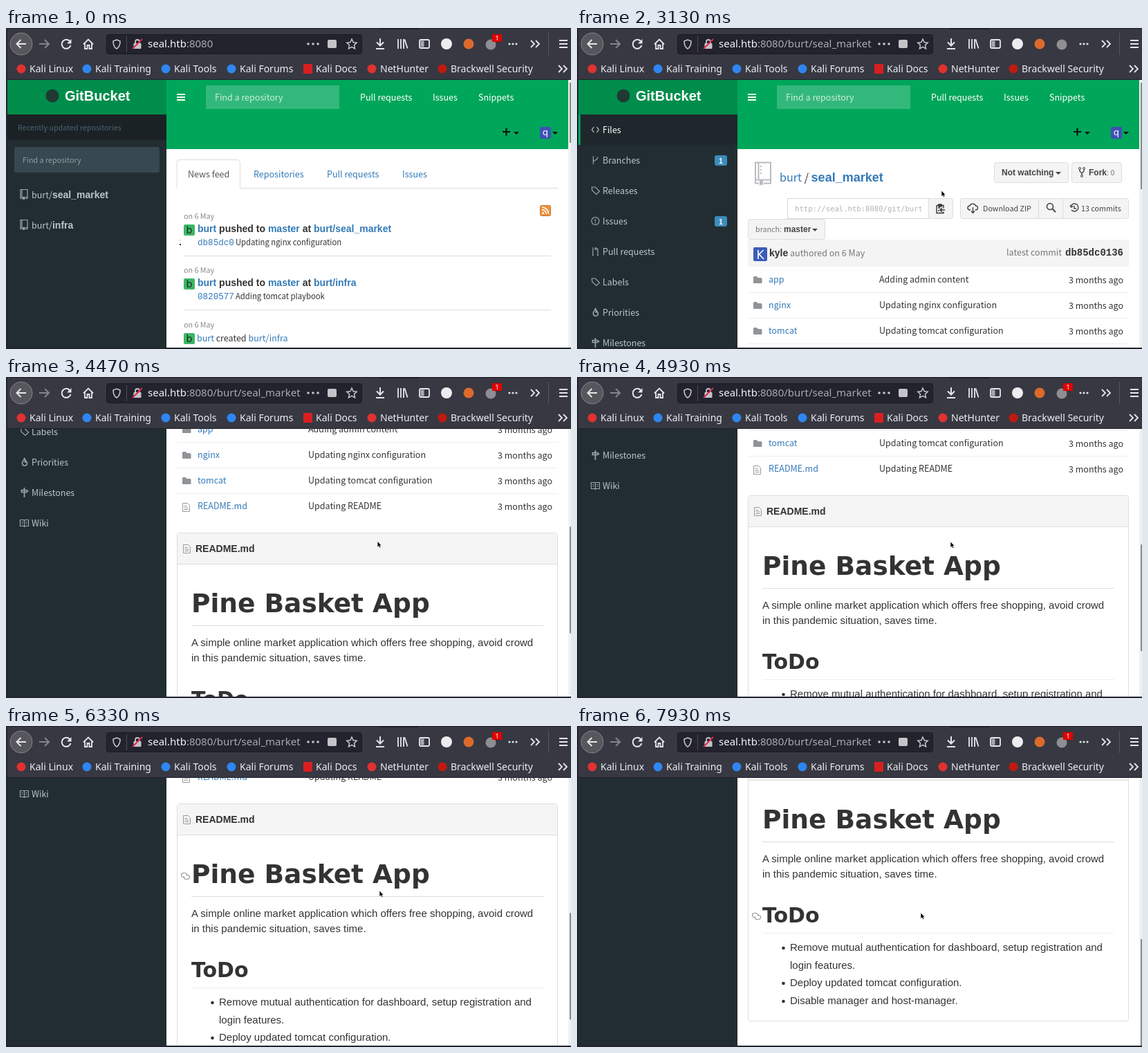
These frames come from a looping animation (817x464 px, 8 s). An HTML page:

```html
<!DOCTYPE html>
<html lang="en">
<head>
<meta charset="utf-8">
<title>Repository browsing</title>
<style>
html, body { margin: 0; width: 100%; height: 100%; overflow: hidden; background: #23252e; }
svg { display: block; width: 100%; height: 100%; }
text { white-space: pre; }
.ui { font-family: "Noto Sans", "Open Sans", sans-serif; }
.page { font-family: "Noto Sans CJK SC", "Noto Sans CJK JP", "Noto Sans CJK", "Noto Sans", sans-serif; }
.bold { font-family: "Liberation Sans", Arial, sans-serif; font-weight: 700; }
.body { font-family: "Liberation Sans", Arial, sans-serif; }
.mono { font-family: "Liberation Mono", monospace; }
.code { font-family: "DejaVu Sans Mono", monospace; }
.head { font-family: "DejaVu Sans", sans-serif; font-weight: 700; }
.avatar { font-family: "DejaVu Sans", sans-serif; }
</style>
</head>
<body>
<svg id="stage" viewBox="0 0 817 464"></svg>
<script>
const LOOP = 8000;
const LINK = '#337ab7', INK = '#333', MUTED = '#777', SIDE = '#b8c7ce';
const USER = 'burt', AUTHOR = 'kyle', REPO = 'seal_market';
const PATH = `/${USER}/${REPO}`;
const PAGE_SCALE = .895; // the page face is drawn larger than its nominal size

const rect = (x, y, w, h, fill, more = '') =>
  `<rect x="${x}" y="${y}" width="${w}" height="${h}" fill="${fill}" ${more}/>`;
const circle = (x, y, r, fill, more = '') =>
  `<circle cx="${x}" cy="${y}" r="${r}" fill="${fill}" ${more}/>`;
const line = (d, stroke, w = 1, more = '') =>
  `<path d="${d}" fill="none" stroke="${stroke}" stroke-width="${w}" ${more}/>`;
const shape = (d, fill) => `<path d="${d}" fill="${fill}"/>`;
const group = (id, content, more = '') => `<g id="${id}" ${more}>${content}</g>`;
const at = (x, y, content) => `<g transform="translate(${x} ${y})">${content}</g>`;
const face = (cls, size) => `class="${cls}" font-size="${cls === 'page' ? size * PAGE_SCALE : size}"`;
const text = (x, y, s, cls, size, fill, more = '') =>
  `<text x="${x}" y="${y}" ${face(cls, size)} fill="${fill}" ${more}>${s}</text>`;
const span = (s, cls, size, fill) => `<tspan ${face(cls, size)} fill="${fill}">${s}</tspan>`;
const caret = (x, y, fill) => shape(`M${x} ${y}h8l-4 4z`, fill);
const button = (x, y, w, h) =>
  rect(x + .5, y + .5, w - 1, h - 1, '#f4f4f4', 'stroke="#ddd" rx="3"');

// ---------- browser chrome ----------

function toolbar() {
  const c = '#e6e6ea', dim = '#85858c', edge = '#1f2028';
  const chevrons = (x, y) => line(`M${x - 6} ${y - 5}l5 5-5 5M${x + 1} ${y - 5}l5 5-5 5`, c, 1.8);
  const marks = [
    ['Kali Linux', 34, '#e0322f'], ['Kali Training', 129, '#2f86f0'], ['Kali Tools', 243, '#2f86f0'],
    ['Kali Forums', 338, '#2f86f0'], ['Kali Docs', 448, '#d81f1f', 1], ['NetHunter', 541, '#e0322f'],
    ['Brackwell Security', 643, '#c01a10'],
  ];
  return rect(0, 0, 817, 75, '#373842') + rect(0, 0, 817, 1, edge) + rect(540, 0, 56, 2, edge) +
    rect(0, 74, 817, 1, edge) + rect(0, 0, 2, 75, '#23252e') +
    circle(22, 23, 16, '#56565d', 'stroke="#85858b"') +
    line('M29 23H15.5M21.5 17l-6 6 6 6', c, 2) +
    line('M48 23h13.5M56 17l6 6-6 6', dim, 2) +
    group('reload', line('M92.5 19.5A6.5 6.5 0 1 0 93.5 25', c, 2) + shape('M94.5 16v6.5h-6.5z', c)) +
    group('stop', line('M81 17l12 12M93 17l-12 12', c, 2)) +
    line('M112 23.5l7-7 7 7M114 22.5V30h3.5v-5h3v5h3.5v-7.5', c, 1.8) +
    rect(145.5, 9.5, 369, 28, '#22232d', 'stroke="#191a22" rx="3"') +
    line('M160 17l5 2c0 6-1.5 9-5 11-3.5-2-5-5-5-11z', '#c4c4c8', 1.6) + rect(174, 12, 1, 23, '#4c4d56') +
    rect(184.5, 22, 11, 8, '#c4c4c8', 'rx="1"') + line('M187 22v-2a3 3 0 0 1 6 0v2', '#c4c4c8', 1.8) +
    line('M183 30L197 16', '#e22850', 2) +
    `<text x="205" y="28" ${face('ui', 15)} fill="#f4f4f6">seal.htb<tspan id="path" fill="#aaaab2"></tspan></text>` +
    [437, 444, 451].map(x => circle(x, 23, 1.8, '#c8c8cc')).join('') +
    rect(465, 17, 13, 12, '#c4c4c8', 'rx="2"') +
    line('M500 16l2.2 4.7 5 .6-3.7 3.5 1 5-4.5-2.5-4.5 2.5 1-5-3.7-3.5 5-.6z', '#c8c8cc', 1.5) +
    line('M541 15v10M536 20.5l5 5 5-5M535 30h12', c, 2) +
    line('M567 16v14M571 16v14M575 16v14M576.5 16.5l4 13', c, 1.8) +
    rect(598, 17, 14, 12, 'none', `rx="2" stroke="${c}" stroke-width="1.8"`) + rect(599.5, 18.5, 5, 9, '#a8a8ae') +
    circle(637, 23, 8, '#ededf0') + circle(669, 23, 7.5, '#dc6a2c') + circle(701, 24, 7.5, '#8e8e93') +
    group('badge', rect(703, 9, 14, 11, '#e00000') + text(710, 18, '1', 'ui', 9.5, '#fff', 'text-anchor="middle"')) +
    [728, 733, 738].map(x => circle(x, 23, 1.6, '#d5e6e2')).join('') +
    chevrons(765, 23) + rect(784, 7, 1, 32, '#55565f') +
    [18, 23, 28].map(y => rect(800, y - 1, 12, 2, c)).join('') +
    marks.map(([label, x, fill, square]) =>
      (square ? rect(x - 18, 52, 13, 14, fill) : circle(x - 12, 59, 6.5, fill)) +
      text(x, 64, label, 'ui', 14, '#eeeef2')).join('') +
    chevrons(805, 59);
}

// ---------- shared page parts ----------

function header() {
  return rect(2, 75, 230, 50, '#008d4c') + rect(232, 75, 581, 100, '#00a65a') +
    circle(67, 98, 9.5, '#1f3a33') + text(85, 105, 'GitBucket', 'bold', 20, '#fff') +
    [95, 99, 103].map(y => rect(247, y, 12, 2, '#fff')).join('') +
    rect(289, 83, 193, 34, '#33b87b') + text(302, 105, 'Find a repository', 'page', 14, '#cdeedd') +
    [['Pull requests', 512], ['Issues', 617], ['Snippets', 683]]
      .map(([s, x]) => text(x, 105, s, 'page', 14, '#fff')).join('') +
    line('M718 150h11M723.5 144.5v11', '#111', 2.2) + caret(734, 150, '#111') +
    rect(772, 143, 16, 17, '#3f51b5', 'rx="2"') + text(780, 155, 'q', 'avatar', 13, '#fff', 'text-anchor="middle"') +
    caret(790, 150, '#111');
}

const bookIcon = (fill) =>
  line('M1 .5h10v11H1zM1 11.5v2h2.5M7 13.5h4v-2M3 .5v11', fill, 1.2) + shape('M4 11.5h3v4l-1.5-1.2L4 15.5z', fill);

// ---------- news feed ----------

function sideRepo(y, name, ink, icon) {
  return at(20, y - 13, bookIcon(icon)) +
    text(37, y, span(USER + '/', 'page', 14, ink) + span(name, 'bold', 14, ink), 'page', 14, ink);
}

function push(y, repo, hash, message) {
  const b = (s, fill) => span(s, 'bold', 14, fill);
  return text(257, y + 276, 'on 6 May', 'page', 12, '#888') + userIcon(y + 284) +
    text(277, y + 295, b(USER, LINK) + b(' pushed to ', INK) + b('master', LINK) + b(' at ', INK) +
      b(`${USER}/${repo}`, LINK), 'bold', 14, INK) +
    text(277, y + 314, hash, 'mono', 12.6, LINK) + text(332, y + 314, message, 'page', 12.6, INK) +
    rect(257, y + 329, 531, 1, '#ddd');
}

const userIcon = (y) => rect(257, y, 16, 16, '#3cb665', 'rx="2"') +
  text(265, y + 13, USER[0], 'avatar', 14, '#1c2b20', 'text-anchor="middle"');

function feed() {
  return rect(2, 75, 230, 387, '#222d32') + header() +
    rect(2, 125, 230, 37, '#1a2226') + text(17, 148, 'Recently updated repositories', 'page', 12, '#4b646f') +
    rect(12, 172, 210, 37, '#374850', 'rx="3"') + text(24, 195, 'Find a repository', 'page', 12, '#919da3') +
    sideRepo(246, REPO, SIDE, '#9aa8af') + sideRepo(290, 'infra', SIDE, '#9aa8af') +
    group('rowHover', rect(2, 219, 230, 44, '#f7f7f7') + sideRepo(246, REPO, INK, '#8d8d8d')) +
    line('M247 231.5V194.5a4 4 0 0 1 4-4h83.5a4 4 0 0 1 4 4v37H798', '#ddd') +
    text(263, 216, 'News feed', 'page', 14, '#555') +
    [['Repositories', 358], ['Pull requests', 464], ['Issues', 573]]
      .map(([s, x]) => text(x, 216, s, 'page', 14, LINK)).join('') +
    rect(772.5, 256.5, 15, 15, '#f0913c', 'rx="2" stroke="#c8742a"') +
    circle(776.5, 267.5, 1.5, '#fff') + line('M775 262.5a6 6 0 0 1 6 6M775 259a9.5 9.5 0 0 1 9.5 9.5', '#fff', 1.7) +
    push(0, REPO, 'db85dc0', 'Updating nginx configuration') +
    push(78, 'infra', '0820577', 'Adding tomcat playbook') +
    text(257, 433, 'on 6 May', 'page', 12, '#888') + userIcon(441) +
    text(276, 453, span(USER, 'page', 14, LINK) + ' created ' + span(USER + '/infra', 'page', 14, LINK), 'page', 14, INK);
}

// ---------- repository ----------

const tag = 'M1 2h5l6 6-4.5 4.5L1.5 7z';
const menu = [
  ['Files', 'M4 3L1 7l3 4M8 3l3 4-3 4'],
  ['Branches', 'M3 3v8M9 4c0 4-6 2-6 6M2 2h2M2 12h2M8 3h2'],
  ['Releases', tag],
  ['Issues', 'M6 1.5a5.5 5.5 0 1 0 .1 0M6 4v4M6 9v1.5'],
  ['Pull requests', 'M2.5 3v9M1.5 2h2M1.5 12.5h2M6 3h3.5v9M7.5 1l-2 2 2 2M8.5 12.5h2'],
  ['Labels', tag],
  ['Priorities', 'M6 1c1 3-3 4-3 7 0 6 7 5 7 1 0-2-1-3-2-4 0 2-1 2-1 2 1-2 0-4-1-6z'],
  ['Milestones', 'M6 0v14M2 3.5h7l2 1.5-2 1.5H2z'],
  ['Wiki', 'M0 2.5h5l1 1 1-1h5v9H7l-1 1-1-1H0zM6 3.5v8M2 5.5h2M2 8h2M8 5.5h2M8 8h2'],
];

function repoMenu() {
  return rect(2, 75, 230, 870, '#222d32') + rect(2, 125, 230, 44, '#1e282c') + rect(2, 125, 3, 44, '#00a65a') +
    menu.map(([label, icon], i) => {
      const y = 147 + 44 * i;
      const count = label === 'Branches' || label === 'Issues';
      return at(20.5, y - 7, line(icon, i ? '#98a7ae' : '#c3ced3', i === 6 || i === 7 ? 1.7 : 1.2)) +
        text(37, y + 5, label, 'page', 14, i ? SIDE : '#fff') +
        (count ? rect(199, y - 7, 18, 15, '#3c8dbc', 'rx="3"') +
          text(208, y + 4.5, '1', 'bold', 10.5, '#fff', 'text-anchor="middle"') : '');
    }).join('');
}

const docIcon = line('M.5 .5h7l3 3v9H.5zM2.5 4.5h4M2.5 7h6M2.5 9.5h6', '#999');
const folder = shape('M0 1.5q0-1.5 1.5-1.5H5l1.5 2H11q1.5 0 1.5 1.5V9q0 1-1 1H1q-1 0-1-1z', '#8f9499');

const files = [
  ['app', 'Adding admin content'], ['nginx', 'Updating nginx configuration'],
  ['tomcat', 'Updating tomcat configuration'], ['README.md', 'Updating README'],
];
const ROW_TOP = 345, ROW = 37;

function fileList() {
  return files.map(([name, message], i) => {
    const y = ROW_TOP + ROW * i;
    return at(255, y + 14, i < 3 ? folder : docIcon) +
      text(277, y + 23, name, 'page', 14, LINK) + text(437, y + 23, message, 'page', 14, INK) +
      text(790, y + 24, '3 months ago', 'page', 14, INK, 'text-anchor="end"') +
      (i ? rect(247, y, 551, 1, '#eee') : '');
  }).join('');
}

function repoHead() {
  return line('M258 194.5h22v25h-22zM258 219.5v5h5M270 224.5h10v-5M262.5 195v24', '#b9bcbf', 2) +
    shape('M264 220h5v8l-2.5-2-2.5 2zM265 199h2v2h-2zM265 204h2v2h-2zM265 209h2v2h-2z', '#b9bcbf') +
    text(293, 222, span(USER, 'page', 18, LINK) + span(' / ', 'page', 18, INK) + span(REPO, 'bold', 18, LINK), 'page', 18, INK) +
    button(603, 194, 108, 30) + text(614, 213, 'Not watching', 'bold', 12, '#444') + caret(692, 208, '#444') +
    button(715, 194, 73, 30) + line('M727 204v3l3 3 3-3v-3M730 210v4', '#444', 1.4) +
    [[727, 203], [733, 203], [730, 214]].map(([x, y]) => circle(x, y, 1.5, '#f4f4f4', 'stroke="#444"')).join('') +
    text(740, 213, span('Fork', 'bold', 12, '#444') + span(': 0', 'page', 12, MUTED), 'page', 12, '#444') +
    rect(304.5, 246.5, 204, 29, '#fff', 'stroke="#d2d6de"') +
    `<g clip-path="url(#field)">${text(315, 265, 'http://seal.htb:8080/git' + PATH, 'code', 10.6, '#b4b4b4')}</g>` +
    button(508, 246, 36, 30) + line('M520 256.5h10v4M520 256.5v11h10v-2M523 255h4v3h-4zM532 263h-7M528 260l-3 3 3 3M522 260h3M522 264h2', '#333', 1.4) +
    button(554, 246, 244, 30) + rect(667, 247, 1, 28, '#ddd') + rect(702, 247, 1, 28, '#ddd') +
    line('M569 263h-1a3 3 0 0 1 0-6 4.5 4.5 0 0 1 8.5 0 3 3 0 0 1 0 6h-1M572.5 259v8M570 264.5l2.5 3 2.5-3', '#444', 1.4) +
    text(587, 265, 'Download ZIP', 'page', 12, '#444') +
    circle(684, 258, 4.5, 'none', 'stroke="#444" stroke-width="1.6"') + line('M687.5 261.5l4.5 4.5', '#444', 2) +
    line('M714 258a5.5 5.5 0 1 1 1 5M713 256l1.5 3 3-1.5M719 257v4h3', '#444', 1.4) +
    text(729, 265, '13 commits', 'page', 12, '#444') +
    button(247, 276, 112, 30) + text(258, 295, 'branch:', 'page', 12, MUTED) +
    text(299, 295, 'master', 'bold', 12, '#444') + caret(340, 290, '#444') +
    rect(247, 306, 551, 39, '#f4f4f4') + rect(255, 317, 20, 20, '#3a5db8', 'rx="2"') +
    text(265, 333.5, AUTHOR[0].toUpperCase(), 'avatar', 17, '#fff', 'text-anchor="middle"') +
    text(278, 330, AUTHOR, 'bold', 14, INK) + text(308, 330, 'authored on 6 May', 'page', 14, MUTED) +
    text(701, 329, 'latest commit', 'page', 14, MUTED, 'text-anchor="end"') +
    text(706, 329, 'db85dc0136', 'mono', 14, INK, 'font-weight="700"');
}

function readme() {
  const para = (x, y, s) => text(x, y, s, 'body', 15, INK);
  return rect(247.5, 513.5, 550, 393, '#fff', 'stroke="#ddd" rx="3"') +
    rect(248, 514, 549, 44, '#f5f5f5') + rect(248, 558, 549, 1, '#ddd') +
    at(256, 530, docIcon) + text(274, 541, 'README.md', 'bold', 14, INK) +
    text(268, 628, 'Pine Basket App', 'head', 37.5, INK) + rect(268, 647, 509, 1, '#ddd') +
    para(268, 677, 'A simple online market application which offers free shopping, avoid crowd') +
    para(268, 699, 'in this pandemic situation, saves time.') +
    text(268, 763.5, 'ToDo', 'head', 30, INK) + rect(268, 779, 509, 1, '#eee') +
    [805, 856, 882].map(y => circle(298.5, y - 4, 2.3, INK)).join('') +
    para(308, 805, 'Remove mutual authentication for dashboard, setup registration and') +
    para(308, 831, 'login features.') + para(308, 856, 'Deploy updated tomcat configuration.') +
    para(308, 882, 'Disable manager and host-manager.') +
    group('anchor', line('M5 6.5H3.5a3 3 0 0 1 0-6H6a3 3 0 0 1 2.5 4M8 3.5h1.5a3 3 0 0 1 0 6H7a3 3 0 0 1-2.5-4', '#999', 1.2));
}

// ---------- assembly ----------

document.getElementById('stage').innerHTML =
  `<defs><clipPath id="view">${rect(2, 75, 815, 387, '#000')}</clipPath>
  <clipPath id="field">${rect(305, 247, 193, 28, '#000')}</clipPath></defs>` +
  rect(0, 0, 817, 464, '#23252e') + toolbar() +
  `<g clip-path="url(#view)">` + rect(2, 75, 815, 387, '#fff') +
  group('feed', feed()) +
  group('repo', repoMenu() + header() + repoHead() + rect(247, 345, 551, 37, '#f4f4f4', 'id="fileHover"') + fileList() + readme()) +
  rect(813, 75, 4, 387, '#f1f1f1') + rect(815, 75, 2, 100, '#8a8a8a', 'id="thumb"') + '</g>' +
  group('status', rect(1.5, 438.5, 10, 24, '#23252e', 'id="statusBox" rx="3" stroke="#5b5c64"') +
    text(6, 456, '', 'ui', 14.3, '#eeeef2', 'id="statusText"')) +
  group('specks', rect(251, 306, 1, 1, '#888') + rect(251, 312, 2, 2, '#222')) +
  group('arrow', '<path d="M0 0V8.5L2 6.8 3.3 9.5 4.8 8.8 3.6 6.2H6Z" stroke="#fff" stroke-width=".6"/>') +
  group('hand', '<path d="M-1 -3h1.5v3l3 .8v4.2l-1 2h-4l-1.5-3v-2h2z" stroke="#fff" stroke-width=".5"/>');

const el = {};
document.querySelectorAll('#stage [id]').forEach(n => el[n.id] = n);
const show = (id, on) => el[id].setAttribute('display', on ? 'inline' : 'none');
const move = (id, x, y) => el[id].setAttribute('transform', `translate(${x.toFixed(1)} ${y.toFixed(1)})`);

// ---------- motion ----------

const pointer = [
  [70, 251, 309], [300, 417, 388], [730, 110, 238], [1270, 110, 238], [1670, 467, 279], [2530, 467, 279],
  [3100, 527, 235], [4000, 534, 237], [4930, 540, 238], [7730, 540, 238], [7930, 497, 270],
];
const scrolling = [[3330, 0], [4000, 174], [4930, 342], [5330, 342], [5730, 401], [6330, 401], [7330, 480]];
const TRACK_TOP = 79, TRACK_END = 462, MAX_SCROLL = 480;
const smooth = p => p * p * (3 - 2 * p);
const glide = p => 1 - (1 - p) ** 1.6;

function sample(keys, t, ease) {
  if (t <= keys[0][0]) return keys[0].slice(1);
  for (let i = 1; i < keys.length; i++) {
    const [a, b] = [keys[i - 1], keys[i]];
    if (t < b[0]) {
      const p = ease((t - a[0]) / (b[0] - a[0]));
      return a.slice(1).map((v, k) => v + (b[k + 1] - v) * p);
    }
  }
  return keys[keys.length - 1].slice(1);
}

function setStatus(s, width) {
  show('status', !!s);
  if (!s) return;
  el.statusText.textContent = s;
  el.statusBox.setAttribute('width', width);
}

function draw(t) {
  const [x, y] = sample(pointer, t, smooth);
  const scroll = Math.round(sample(scrolling, t, glide)[0]);
  const inRepo = t >= 2270;
  const docY = y + scroll;

  el.path.textContent = ':8080' + (t >= 1870 ? PATH : '');
  show('badge', t < 1870 || t >= 3330);
  const loading = t >= 1300 && t < 2530;
  show('stop', loading);
  show('reload', !loading);

  show('feed', !inRepo);
  show('repo', inRepo);
  show('rowHover', t >= 930);
  move('repo', 0, -scroll);

  const row = Math.floor((docY - ROW_TOP) / ROW);
  const onFile = inRepo && row >= 0 && row < files.length;
  show('fileHover', onFile);
  el.fileHover.setAttribute('y', ROW_TOP + ROW * Math.max(row, 0));

  const onTitle = docY > 585 && docY < 648, onTodo = docY > 732 && docY < 780;
  show('anchor', inRepo && (onTitle || onTodo));
  move('anchor', 253, onTitle ? 613 : 750);

  const thumb = inRepo ? 154 : 87;
  el.thumb.setAttribute('y', TRACK_TOP + scroll / MAX_SCROLL * (TRACK_END - TRACK_TOP - thumb));
  el.thumb.setAttribute('height', thumb);

  if (t >= 930 && !inRepo) setStatus('seal.htb:8080' + PATH, 219);
  else if (onFile && row === 1) setStatus(`seal.htb:8080${PATH}/commit/db85dc0136b335d873a07420aa8963491c6cd362`, 609);
  else setStatus('');

  const hand = onFile || (t >= 730 && t < 1300);
  show('specks', t < 70);
  show('arrow', t >= 70 && !hand);
  show('hand', hand);
  move('arrow', x, y);
  move('hand', x, y);
}

const start = performance.now();
function tick() {
  draw((performance.now() - start) % LOOP);
  requestAnimationFrame(tick);
}
draw(0);
requestAnimationFrame(tick);
</script>
</body>
</html>
```
